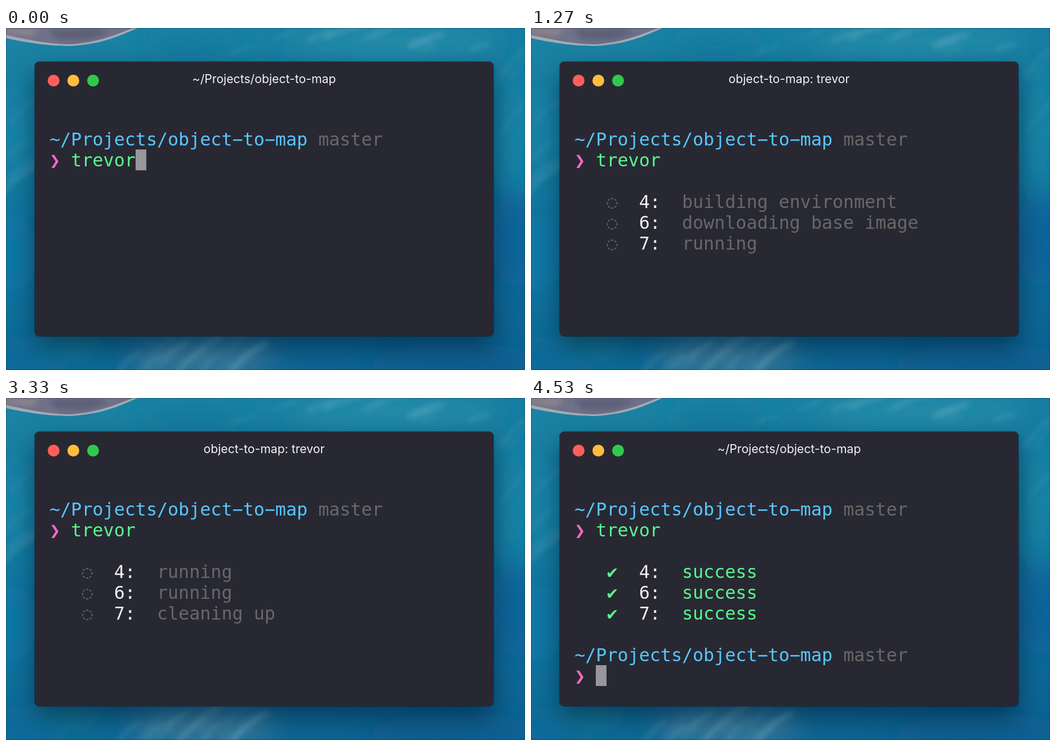
An HTML page for the animation above (4590 ms loop, 921x608 px).

```html
<!DOCTYPE html>
<html lang="en">
<head>
<meta charset="utf-8">
<title>Terminal</title>
<style>
  html, body { margin: 0; width: 100%; height: 100%; overflow: hidden; background: #12709c; }
  body { position: relative; }
  #sea { position: absolute; left: 0; top: 0; }
  #frame { position: absolute; inset: 0; box-shadow: inset 0 0 1px 1px rgba(0, 25, 55, .3); }
  #window {
    position: absolute; left: 51px; top: 60px; width: 814px; height: 488px;
    border-radius: 8px; background: #282833;
    box-shadow: 0 0 0 1px rgba(0, 0, 0, .3), 0 20px 46px rgba(0, 15, 35, .5);
  }
  #window i { position: absolute; top: 22.5px; width: 21px; height: 21px; border-radius: 50%; }
  #title {
    position: absolute; top: 18px; width: 100%; text-align: center;
    font: 21.2px/25px Inter, sans-serif; color: #f3f3f4;
  }
  #screen {
    position: absolute; left: 26.2px; top: 120px; margin: 0; color: #f1f1f0;
    font: 31.7px/37px "DejaVu Sans Mono", "DejaVu Sans", monospace;
    font-variant-ligatures: none;
  }
  .path { color: #57c7ff; }
  .dim { color: #686868; }
  .pink { color: #ff6ac1; }
  .green { color: #5af78e; }
  .cell { display: inline-block; width: 1ch; height: 37px; vertical-align: top; }
  .cursor { position: relative; top: -1px; background: #97979b; }
</style>
</head>
<body>
<svg id="sea" width="921" height="608" viewBox="0 0 921 608">
  <defs>
    <linearGradient id="water" x1=".35" y1="0" x2=".65" y2="1">
      <stop offset="0" stop-color="#1a82a3"/>
      <stop offset=".5" stop-color="#11759f"/>
      <stop offset="1" stop-color="#0d6594"/>
    </linearGradient>
    <filter id="soft" x="-50%" y="-50%" width="200%" height="200%"><feGaussianBlur stdDeviation="22"/></filter>
    <filter id="haze" x="-50%" y="-50%" width="200%" height="200%"><feGaussianBlur stdDeviation="5"/></filter>
  </defs>
  <rect width="921" height="608" fill="url(#water)"/>
  <g filter="url(#soft)">
    <ellipse cx="690" cy="25" rx="190" ry="35" fill="#208aa7"/>
    <ellipse cx="330" cy="35" rx="90" ry="25" fill="#147a9f"/>
    <ellipse cx="15" cy="190" rx="35" ry="80" fill="#1884a8"/>
    <ellipse cx="10" cy="400" rx="45" ry="70" fill="#1178a6"/>
    <ellipse cx="20" cy="590" rx="90" ry="40" fill="#116a9a"/>
    <ellipse cx="110" cy="560" rx="60" ry="20" fill="#167c98"/>
    <ellipse cx="900" cy="180" rx="35" ry="110" fill="#1985a7"/>
    <ellipse cx="905" cy="380" rx="45" ry="80" fill="#0b659b"/>
    <ellipse cx="800" cy="600" rx="160" ry="40" fill="#0b6092"/>
    <ellipse cx="350" cy="585" rx="130" ry="30" fill="#3b7c9c"/>
  </g>
  <g id="wisps" filter="url(#haze)" fill="none" stroke="#8ec5d3" stroke-linecap="round"/>
  <path d="M0 18C50 29 85 32 115 32C175 28 200 14 234 0H0Z" fill="#a3adb8"/>
  <path d="M0 12C50 24 85 29 115 29C165 25 195 12 226 0H0Z" fill="#70718a"/>
  <g filter="url(#haze)">
    <path d="M0 0H60L45 15L0 10Z" fill="#8a838c"/>
    <path d="M75 3L160 0L185 9L140 22L90 20Z" fill="#5d6078"/>
  </g>
</svg>
<div id="frame"></div>
<div id="window">
  <i style="left:22.5px;background:#ff5f58"></i>
  <i style="left:58px;background:#ffbd3e"></i>
  <i style="left:93px;background:#30ca4b"></i>
  <div id="title"></div>
  <pre id="screen"></pre>
</div>
<script>
const LOOP = 4590, ENTER = 330, LIST = 460, DONE = 4400;
const STATES = ['downloading base image', 'building environment', 'running', 'cleaning up', 'success'];

// Start times of each state after the first
const jobs = [
  { version: 4, times: [1070, 2330, 3530, 4130] },
  { version: 6, times: [1670, 2530, 4000, 4270] },
  { version: 7, times: [870, 1200, 3270, 3670] },
];

const title = document.getElementById('title');
const screen = document.getElementById('screen');

const span = (name, text) => `<span class="${name}">${text}</span>`;
const cell = (color, text) => span(`cell ${color}`, text);
// The terminal face has a long hyphen
const heading = span('path', '~/Projects/object\u2212to\u2212map') + ' ' + span('dim', 'master');
const prompt = `${heading}\n${cell('pink', '❯')} `;
const cursor = cell('cursor', ' ');

function jobLine({ version, times }, t) {
  const state = times.filter(start => t >= start).length;
  const done = state === STATES.length - 1;
  const color = done ? 'green' : 'dim';
  return `   ${cell(color, done ? '✔' : '◌')}  ${version}:  ${span(color, STATES[state])}`;
}

function render(t) {
  const busy = t >= ENTER && t < DONE;
  let text = prompt + span('green', 'trevor');
  if (t < ENTER) text += cursor;
  if (t >= LIST) text += '\n\n' + jobs.map(job => jobLine(job, t)).join('\n');
  if (t >= DONE) text += `\n\n${prompt}${cursor}`;
  return [busy ? 'object-to-map: trevor' : '~/Projects/object-to-map', text];
}

// Faint currents scattered over a box
let seed = 7;
const random = () => (seed = seed * 16807 % 2147483647) / 2147483647;
function currents(x, y, w, h, slope, count) {
  let paths = '';
  for (let i = 0; i < count; i++) {
    const x0 = x + random() * w, y0 = y + random() * h, length = 25 + random() * 50;
    paths += `<path d="M${x0} ${y0}q${length * .4} ${length * slope * .7} ${length} ${length * slope}"
      stroke-width="${3 + random() * 8}" opacity="${.08 + random() * .14}"/>`;
  }
  return paths;
}
document.getElementById('wisps').innerHTML =
  currents(400, 0, 460, 50, -.35, 12) + currents(200, 580, 210, 50, -.9, 18) +
  currents(-20, 100, 40, 200, -.8, 4) + currents(865, 60, 30, 160, -1, 3);

let shown = '';
function tick(now) {
  const [name, text] = render(now % LOOP);
  if (text + name !== shown) {
    shown = text + name;
    title.textContent = name;
    screen.innerHTML = text;
  }
  requestAnimationFrame(tick);
}
tick(0);
</script>
</body>
</html>
```
